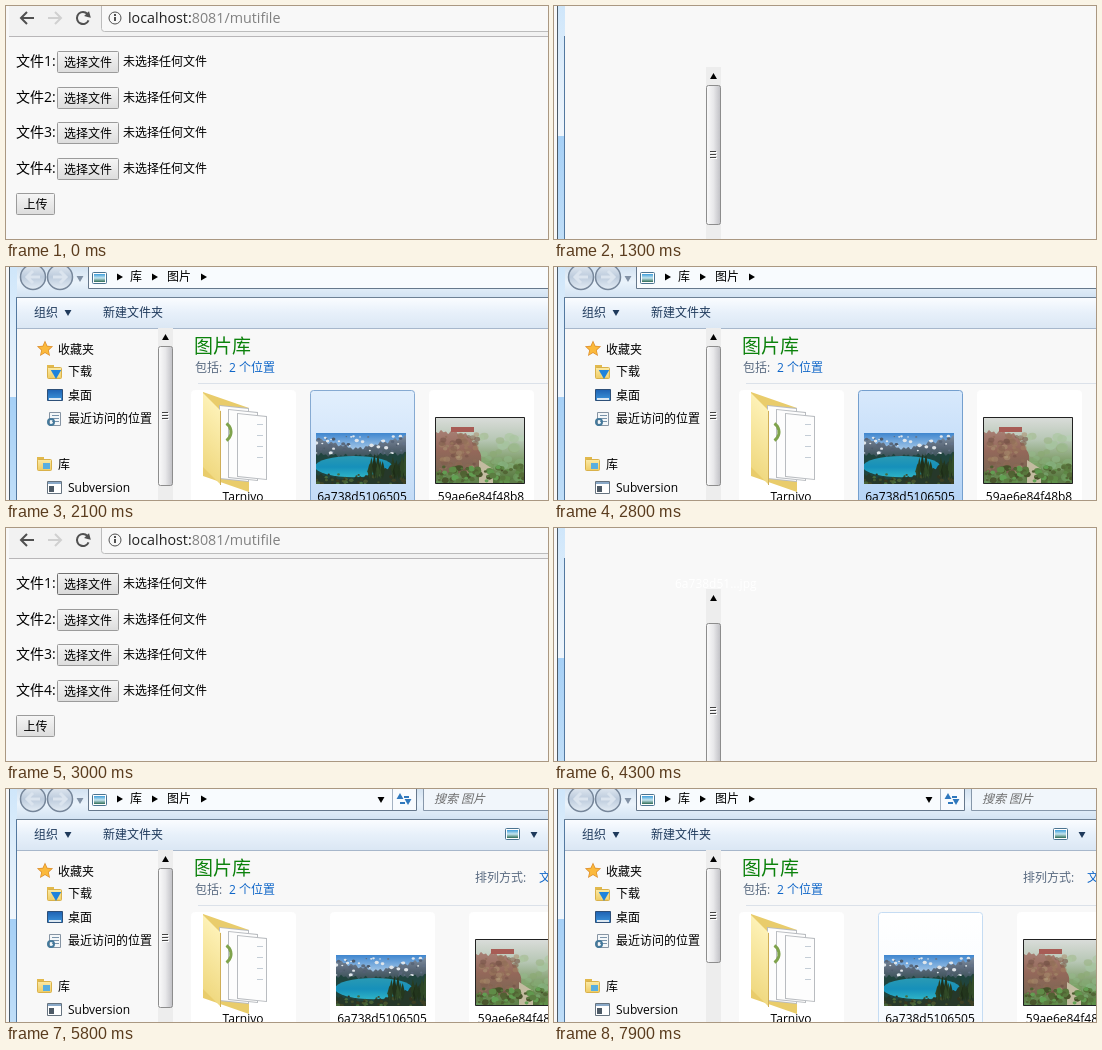
An HTML page with a canvas that plays this animation: 542 by 233 pixels, repeating every 8 s.

```html
<!DOCTYPE html>
<html lang="zh">
<head>
<meta charset="utf-8">
<title>多文件上传</title>
<style>
html, body { margin: 0; width: 100%; height: 100%; overflow: hidden; background: #f8f8f8; }
canvas { display: block; }
</style>
</head>
<body>
<canvas id="stage" width="542" height="233"></canvas>
<script>
const W = 542, H = 233, LOOP = 8000;
const PAGE = '#f8f8f8', INK = '#000', NAVY = '#1e395b', LINK = '#0f66c8';
const SANS = '"Open Sans", "Noto Sans CJK SC", "Noto Sans CJK", sans-serif';
const g = document.getElementById('stage').getContext('2d');

// ---- Drawing helpers ----
function rect(x, y, w, h, fill) {
  g.fillStyle = fill;
  g.fillRect(x, y, w, h);
}
function text(s, x, y, color = INK, size = 12, align = 'left', style = '') {
  g.font = `${style} ${size}px ${SANS}`;
  g.textAlign = align;
  g.fillStyle = color;
  g.fillText(s, x, y);
}
function ramp(top, bottom, ...colors) {
  const r = g.createLinearGradient(0, top, 0, bottom);
  colors.forEach((c, i) => r.addColorStop(i / (colors.length - 1), c));
  return r;
}
function box(x, y, w, h, fill, border, radius = 0) {
  g.beginPath();
  g.roundRect(x + .5, y + .5, w - 1, h - 1, radius);
  g.fillStyle = fill;
  g.fill();
  g.strokeStyle = border;
  g.lineWidth = 1;
  g.stroke();
}
function oval(x, y, rx, ry, fill) {
  g.beginPath();
  g.ellipse(x, y, rx, ry, 0, 0, 7);
  g.fillStyle = fill;
  g.fill();
}
function ring(x, y, r, color, width = 1, from = 0, to = 2 * Math.PI) {
  g.beginPath();
  g.arc(x, y, r, from, to);
  g.strokeStyle = color;
  g.lineWidth = width;
  g.stroke();
}
// A star polygon; equal radii give a regular polygon.
function spikes(x, y, count, radius, inner, fill, turn = 0) {
  g.beginPath();
  for (let i = 0; i < count * 2; i++) {
    const r = i % 2 ? inner : radius, a = turn + i * Math.PI / count;
    g.lineTo(x + r * Math.cos(a), y + r * Math.sin(a));
  }
  g.fillStyle = fill;
  g.fill();
}
const triangle = (x, y, turn, color = INK, r = 4) => spikes(x, y, 3, r, r / 2, color, turn);
const RIGHT = 0, DOWN = Math.PI / 2, UP = -DOWN;
function arrow(x, y, dir, color, width) {
  g.beginPath();
  g.moveTo(x - 6 * dir, y);
  g.lineTo(x + 7 * dir, y);
  g.moveTo(x, y - 6);
  g.lineTo(x - 6 * dir, y);
  g.lineTo(x, y + 6);
  g.strokeStyle = color;
  g.lineWidth = width;
  g.stroke();
}
// A sheet whose right edge is lower than its left by `drop`.
function sheet(x, y, w, h, drop, fill) {
  g.save();
  g.transform(1, drop / w, 0, 1, x, y);
  rect(0, 0, w, h, fill);
  g.restore();
}
function seeded(seed) {
  return () => (seed = seed * 16807 % 2147483647) / 2147483647;
}

// ---- Browser page ----
const BUTTON = {
  idle: ['#f6f6f6', '#dcdcdc', '#9b9b9b'],
  hover: ['#fafafa', '#e6e6e6', '#808080'],
  down: ['#d6d6d6', '#efefef', '#707070'],
  focus: ['#f4f4f4', '#d8d8d8', '#707070']
};
function button(label, x, y, w, state) {
  const [top, bottom, border] = BUTTON[state];
  box(x, y, w, 22, ramp(y, y + 22, top, bottom), border, 1);
  text(label, x + w / 2, y + 16, INK, 12, 'center');
}
function addressBar() {
  const grey = '#505050';
  rect(3, 0, W, 30, '#f2f2f2');
  rect(3, 30, W, 1, '#b8b6b8');
  box(95, -8, W, 34, PAGE, '#bcbcbc', 3);
  arrow(21, 12, 1, grey, 2);
  arrow(49, 12, -1, '#d0d0d0', 2);
  ring(77, 12, 6, grey, 2, .4, 5.5);
  triangle(82, 9, Math.PI / 4, grey);
  ring(109, 12, 6, grey);
  rect(108, 11, 2, 4, grey);
  rect(108, 8, 2, 2, grey);
  text('localhost:', 122, 17, '#222', 14.3);
  text('8081/mutifile', 122 + g.measureText('localhost:').width, 17, '#808080', 14.3);
}
function browser(states, fileName) {
  rect(0, 0, W, H, PAGE);
  addressBar();
  for (let i = 0; i < 4; i++) {
    const y = 45 + Math.round(i * 35.6);
    text(`文件${i + 1}:`, 10, y + 15, INK, 14);
    button('选择文件', 51, y, 62, states[i] || 'idle');
    text(!i && fileName || '未选择任何文件', 117, y + 15);
  }
  button('上传', 10, 187, 39, 'idle');
}

// ---- Dialog frame ----
function leftEdge() {
  rect(4, 0, 7, 130, ramp(0, 130, '#cfe6fa', '#f0f6fc'));
  rect(4, 130, 7, H, ramp(130, H, '#a6d0f6', '#c0def8'));
  rect(3, 0, 1, H, '#4b5966');
  rect(10, 30, 1, H, '#53789f');
}
function scrollbar(top, length) {
  const middle = Math.round(top + length / 2) - 1;
  rect(152, 61, 15, H, '#ededed');
  triangle(159.5, 71, UP);
  const metal = g.createLinearGradient(152, 0, 167, 0);
  ['#fcfcfc', '#e8e8ea', '#bdbdc2'].forEach((c, i) => metal.addColorStop(i / 2, c));
  box(152, top, 15, length, metal, '#8d8d8d', 2);
  for (let y = middle - 3; y <= middle + 3; y += 3) {
    rect(156, y, 6, 1, '#444');
    rect(157, y + 1, 6, 1, '#fff');
  }
}
function pictureIcon(x, y) {
  box(x, y, 15, 12, '#fff', '#4a7390', 1);
  rect(x + 2, y + 2, 11, 8, ramp(y + 2, y + 10, '#3f9edb', '#c4e4ee', '#2f6d56'));
}
function navBar(narrow) {
  rect(4, 0, W, 30, ramp(0, 30, '#d3e2f1', '#eaf3fb', '#d3e3f3'));
  leftEdge();
  for (const [x, dir] of [[27, 1], [54, -1]]) {
    oval(x, 10, 13, 13, ramp(-3, 23, '#e4ebf3', '#bccbdc', '#e6eef6'));
    ring(x, 10, 12.5, '#76869a', 1.5);
    arrow(x, 10, dir, '#dbe4ee', 3);
  }
  triangle(74, 11, DOWN, '#8191a5');
  box(82, -4, narrow ? 329 : W, 26, '#f8fbfe', '#66788c');
  pictureIcon(86, 5);
  [113, 148, 197].forEach(x => triangle(x, 10, RIGHT));
  text('库', 124, 14);
  text('图片', 161, 14);
  if (!narrow) return;
  triangle(375, 10, DOWN);
  rect(386, 0, 1, 21, '#a4b2c2');
  for (const [x, turn] of [[394, UP], [402, DOWN]]) {
    triangle(x, 10 + 2 * Math.sign(turn), turn, '#2f78bd');
    rect(Math.min(x, 398), 10 - Math.sign(turn) * 3, 5, 2, '#2f78bd');
  }
  box(417, -4, W, 26, '#f1f6fb', '#8697aa');
  text('搜索 图片', 428, 14, '#6d6d6d', 12, 'left', 'italic');
}
function toolbar(narrow) {
  rect(10, 30, W, 1, '#6d8094');
  rect(11, 31, W, 30, ramp(31, 61, '#fafcff', '#e7f0fa', '#dbe7f4'));
  rect(11, 61, W, 1, '#a7b7cb');
  text('组织', 28, 50, NAVY);
  triangle(62, 45, DOWN, NAVY);
  text('新建文件夹', 97, 50, NAVY);
  if (narrow) {
    pictureIcon(499, 39);
    triangle(528, 45, DOWN, NAVY);
  }
}

// ---- Sidebar ----
function folderIcon(x, y, mark) {
  rect(x, y, 7, 4, '#e2b94c');
  box(x, y + 2, 15, 12, ramp(y, y + 14, '#fdf0b4', '#efcb62'), '#d9b14a', 1);
  rect(x + 6, y + 6, 7, 6, mark);
}
function sidebar() {
  spikes(39, 82, 5, 8.5, 4, '#d98a2b', UP);
  spikes(39, 82, 5, 7, 3.2, '#fbb93c', UP);
  text('收藏夹', 52, 87);
  folderIcon(41, 98, '#f6dc86');
  triangle(50, 106, DOWN, '#1f83dc', 6);
  text('下载', 62, 109);
  box(41, 122, 16, 12, ramp(122, 134, '#1c5fb0', '#3f97dd'), '#2d4f78');
  rect(43, 131, 12, 2, '#dce8f2');
  text('桌面', 62, 133);
  box(43, 145, 12, 14, '#f4f7f9', '#8694a3');
  for (let y = 148; y < 156; y += 3) rect(46, y, 7, 1, '#7993aa');
  ring(45, 155, 3, '#44799b', 2);
  text('最近访问的位置', 62, 156);
  folderIcon(31, 190, '#58aee0');
  text('库', 52, 202);
  box(41, 214, 15, 13, '#fff', '#66737f');
  rect(42, 215, 13, 2, '#8aa9c8');
  rect(43, 219, 5, 6, '#4d5a66');
  text('Subversion', 62, 225);
}

// ---- Pictures ----
function speckle(random, count, x, y, w, h, size, color) {
  for (let i = 0; i < count; i++) {
    const u = random(), v = random(), r = size * (.5 + random());
    oval(x + u * w, y + v * h, r, r * .8, color(u, v, random()));
  }
}
// Fills below a rough skyline given as height over u in 0..1.
function ridge(w, h, skyline, fill) {
  g.beginPath();
  g.moveTo(0, h);
  for (let x = 0; x <= w; x++) g.lineTo(x, skyline(x / w) + 2 * Math.sin(x * .9) * Math.sin(x * .37));
  g.lineTo(w, h);
  g.fillStyle = fill;
  g.fill();
}
function lake(w, h) {
  const random = seeded(41);
  rect(0, 0, w, h, ramp(0, h / 2, '#3f86cf', '#dcebf5'));
  ridge(w, h, u => 16 - 22 * Math.abs(u - .45), ramp(0, 28, '#8594a8', '#5a6878', '#2f4a4c'));
  speckle(random, 50, 0, 3, w, 18, 1.5, (u, v, k) => k > .65 ? '#dfe5ea' : `hsl(215 16% ${35 + 20 * k}%)`);
  ridge(w, h, u => 23 - 4 * Math.abs(u - .4), '#20443e');
  oval(w * .42, h * .66, w * .43, h * .21, ramp(24, 44, '#2899b4', '#1690ba', '#2db2c6'));
  ridge(w, h, u => 41 + 6 * Math.sin(u * 4) - 10 * u * u, '#26382a');
  speckle(random, 45, 0, 41, w, 10, 1.6, (u, v, k) => `hsl(${50 + 60 * k} 28% ${14 + 20 * k}%)`);
  for (let i = 0; i < 16; i++) {
    const x = w * (.58 + .42 * random()), tall = 14 + 16 * random();
    spikes(x, h - 5 - tall / 2, 2, tall / 2, 2.2, `hsl(105 30% ${12 + 14 * random()}%)`, UP);
  }
}
function cliff(w, h) {
  const random = seeded(77);
  rect(0, 0, w, h, ramp(0, h, '#d9dcd9', '#b7c7b5', '#7e9c68', '#4f7038'));
  speckle(random, 90, 0, 18, w, h, 4, (u, v, k) => `hsl(${90 + 25 * k} 24% ${64 - 36 * v + 14 * k}% / .7)`);
  ridge(w * .52, h * .85, u => 14 + 26 * u ** 5, ramp(10, 56, '#a98277', '#94685a', '#786652'));
  speckle(random, 70, 4, 16, 38, 38, 2.4, (u, v, k) => `hsl(${12 + 25 * k} 25% ${34 + 25 * k}% / .6)`);
  rect(15, 9, 23, 5, '#a75c55');
  sheet(43, 42, 14, 25, 9, '#c3bba0');
  speckle(random, 85, 0, 48, w, h - 48, 2.5, (u, v, k) => `hsl(${75 + 35 * k} 32% ${24 + 25 * k}%)`);
}
function picture(x, y, w, h, paint) {
  g.save();
  g.translate(x, y);
  g.beginPath();
  g.rect(0, 0, w, h);
  g.clip();
  paint(w, h);
  g.restore();
}
function bigFolder(x, y) {
  sheet(x, y, 46, 84, 16, '#e9cc6b');
  for (let i = 0; i < 3; i++) {
    const left = x + 16 + i * 9, top = y + 13 + i * 4;
    sheet(left, top, 30, 74 - i * 5, 3, '#b9bcc0');
    sheet(left + 1, top + 1, 28, 72 - i * 5, 3, '#fdfdfd');
    for (let k = 1; k < 5; k++) rect(left + 20, top + k * 11, 6, 1, '#c4cdd6');
  }
  ring(x + 18, y + 40, 10, '#7fa34c', 3, -1, 1);
  sheet(x, y + 1, 18, 74, 18, ramp(0, 74, '#fdf1b6', '#f0d981'));
  rect(x + 17, y + 19, 1, 74, '#cfae57');
}

// ---- File list ----
const HIGHLIGHT = {
  none: ['#fff', '#fff', '#fff'],
  hover: ['#fff', '#f6fafe', '#c5dcf3'],
  selected: ['#e2effd', '#c4dcf7', '#86aad2'],
  active: ['#d8e9fc', '#b5d4f6', '#749fce']
};
function tile(center, label, highlight = 'none') {
  const [top, bottom, border] = HIGHLIGHT[highlight];
  box(center - 51, 123, 105, 120, ramp(123, H, top, bottom), border, 3);
  text(label, center + 1, 234, INK, 12, 'center');
}
function heading(narrow) {
  text('图片库', 188, 86, '#0c820c', 19);
  text('包括:', 189, 105, '#596a80');
  text('2 个位置', 223, 105, LINK);
  rect(192, 116, W, 1, '#dbe1e9');
  if (narrow) {
    text('排列方式:', 469, 93, '#596a80');
    text('文件夹', 533, 93, LINK);
  }
}
function items(narrow, highlight) {
  const first = 236, pitch = narrow ? 139 : 119;
  const second = first + pitch, third = second + pitch;
  tile(first, 'Tarnivo');
  tile(third, '59ae6e84f48b8');
  tile(second, '6a738d5106505', highlight);
  bigFolder(197, 125);
  picture(second - 45, 166, 90, 51, lake);
  box(third - 45, 150, 90, 67, '#222', '#222');
  picture(third - 44, 151, 88, 65, cliff);
}

// ---- Timeline ----
const FILE = '6a738d51…jpg';
const OPEN = [1300, 4300], CLOSE = 3000, NAMED = 3100, RESIZE = 5700, SCROLL = 7000;

function buttonState(t, hover, press) {
  if (t < hover) return 'idle';
  if (t < press) return 'hover';
  return t < press + 100 ? 'down' : 'focus';
}
function highlightAt(t) {
  if (t >= 7900) return 'hover';
  if (t >= CLOSE || t < 2100) return 'none';
  return t < 2800 ? 'selected' : 'active';
}
function dialog(t) {
  const again = t >= OPEN[1], narrow = t >= RESIZE;
  const level = Math.floor((t - OPEN[+again]) / 100);
  rect(0, 0, W, H, PAGE);
  if (level > 0) {
    navBar(narrow);
    toolbar(narrow);
  } else {
    leftEdge();
    if (again) text(FILE, 121, 60, '#fff');
  }
  if (level > 1) sidebar();
  if (again && level < 2) scrollbar(95, 175);
  else scrollbar(79, t < SCROLL ? 140 : 95);
  if (level > 2) heading(narrow);
  if (level > 3) items(narrow, highlightAt(t));
}
function draw(t) {
  const open = t >= OPEN[1] || t >= OPEN[0] && t < CLOSE;
  if (open) return dialog(t);
  const second = buttonState(t, 3800, 4000);
  const first = second === 'down' || second === 'focus' ? 'idle' : buttonState(t, 800, 900);
  browser([first, second], t >= NAMED && FILE);
}
function play() {
  draw(performance.now() % LOOP);
  requestAnimationFrame(play);
}
play();
</script>
</body>
</html>
```
